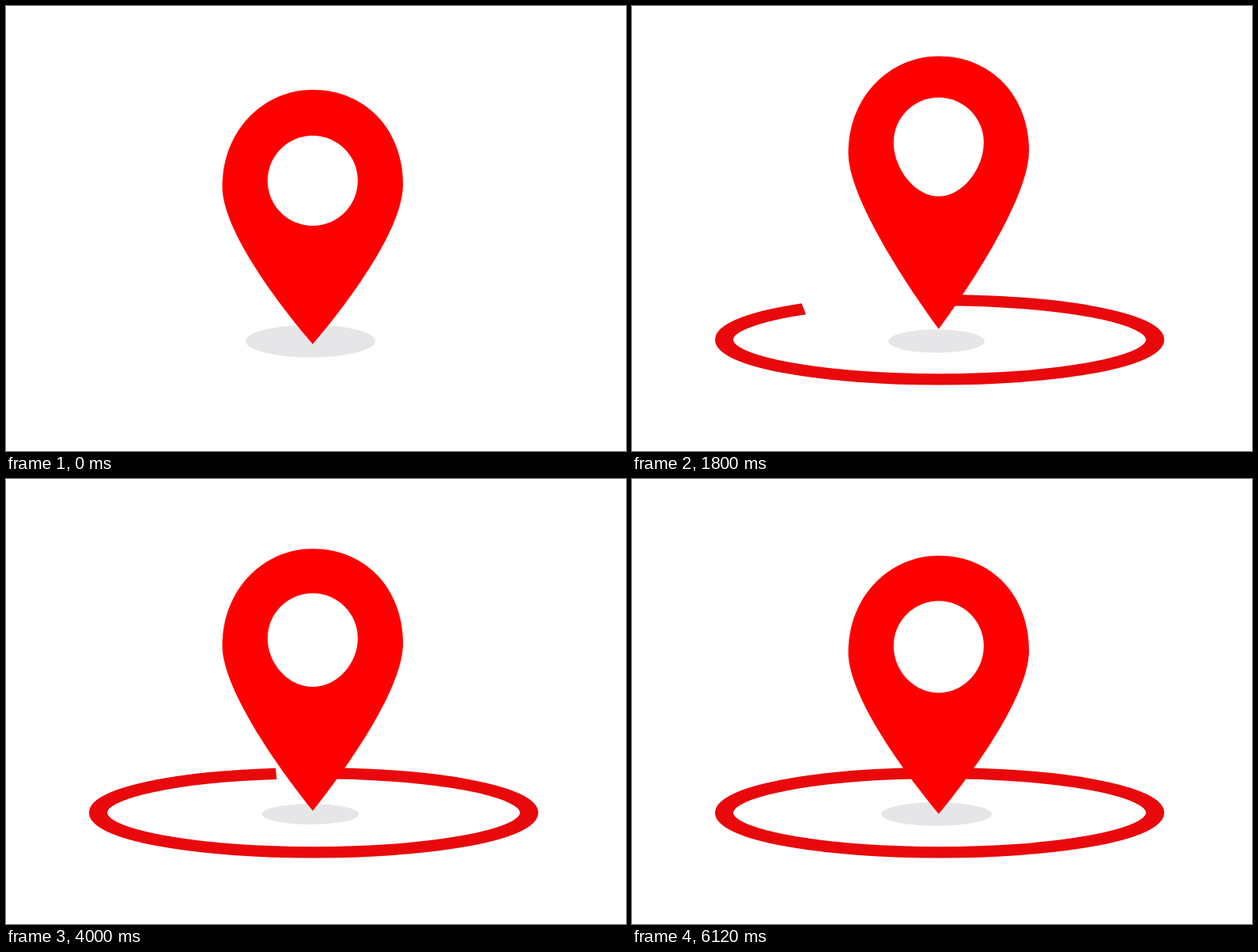
An HTML page for the animation above (6160 ms loop, 784 by 563 pixels).

```html
<!DOCTYPE html>
<html lang="en">
<head>
<meta charset="utf-8">
<title>Location pin</title>
<style>
  html, body { margin: 0; width: 100%; height: 100%; overflow: hidden; background: #fff; }
  svg { display: block; width: 784px; height: 563px; }
</style>
</head>
<body>
<svg viewBox="0 0 784 563">
  <ellipse id="shadow" cx="385" cy="424" fill="#e6e6e8"/>
  <!-- squashed group gives the ring its flattened pen -->
  <g transform="translate(389 422.2) scale(1 .622)">
    <path id="ring" d="M0-80.6A272.5 80.6 0 0 1 0 80.6A272.5 80.6 0 0 1 0-80.6"
      pathLength="1" fill="none" stroke="#e9080c" stroke-width="23"/>
  </g>
  <path id="body" fill="#f00"/>
  <path id="hole" fill="#fff"/>
</svg>
<script>
const LOOP = 6160, CYCLE = 1040, STEP = 40;
const CX = 387.8, R = 57, K = R * 0.5523;

// each track: [time, value] pairs, eased between
const tracks = {
  top:     [[0, 106], [400, 139], [720, 61], [1000, 106]],
  tip:     [[0, 427.7], [400, 427.7], [720, 407.5], [1000, 427.7]],
  holeTop: [[0, 164], [400, 186], [710, 111.6], [1000, 164]],
  holeEnd: [[0, 278], [400, 292], [710, 237.6], [1000, 278]],
  shadowX: [[0, 82], [400, 95.3], [840, 57.6], [1000, 82]],
  shadowY: [[0, 20.5], [400, 23.8], [880, 13], [1000, 20.5]],
  trim:    [[0, 0], [1000, 1]]
};

const ease = x => x * x * (3 - 2 * x);

function valueAt(keys, t) {
  for (let i = 1; i < keys.length; i++) {
    const [t0, a] = keys[i - 1], [t1, b] = keys[i];
    if (t < t1) return a + (b - a) * ease((t - t0) / (t1 - t0));
  }
  return keys[keys.length - 1][1];
}

function bodyPath(top, tip) {
  const left = top + 122.5, right = top + 120;
  return `M${CX} ${top}C454 ${top} 502 ${top + 50} 502 ${right}` +
    `C502 ${right + 72} ${CX} ${tip} ${CX} ${tip}` +
    `C${CX} ${tip} 273.5 ${left + 70} 273.5 ${left}` +
    `C273.5 ${top + 51} 326 ${top} ${CX} ${top}Z`;
}

// only the lower vertex moves on its own; the handles keep their length
function holePath(top, end) {
  const mid = top + R, l = CX - R, r = CX + R;
  return `M${CX} ${top}C${CX + K} ${top} ${r} ${mid - K} ${r} ${mid}` +
    `C${r} ${mid + K} ${CX + K} ${end} ${CX} ${end}` +
    `C${CX - K} ${end} ${l} ${mid + K} ${l} ${mid}` +
    `C${l} ${mid - K} ${CX - K} ${top} ${CX} ${top}Z`;
}

const [shadow, ring, body, hole] =
  ["shadow", "ring", "body", "hole"].map(id => document.getElementById(id));

function draw(time) {
  const t = Math.floor((time % LOOP) / STEP) * STEP % CYCLE;
  const at = name => valueAt(tracks[name], t);
  shadow.setAttribute("rx", at("shadowX"));
  shadow.setAttribute("ry", at("shadowY"));
  ring.setAttribute("visibility", t ? "visible" : "hidden");
  ring.setAttribute("stroke-dasharray", `${at("trim")} 2`);
  body.setAttribute("d", bodyPath(at("top"), at("tip")));
  hole.setAttribute("d", holePath(at("holeTop"), at("holeEnd")));
}

const start = performance.now();
function tick() {
  draw(performance.now() - start);
  requestAnimationFrame(tick);
}
tick();
</script>
</body>
</html>
```
